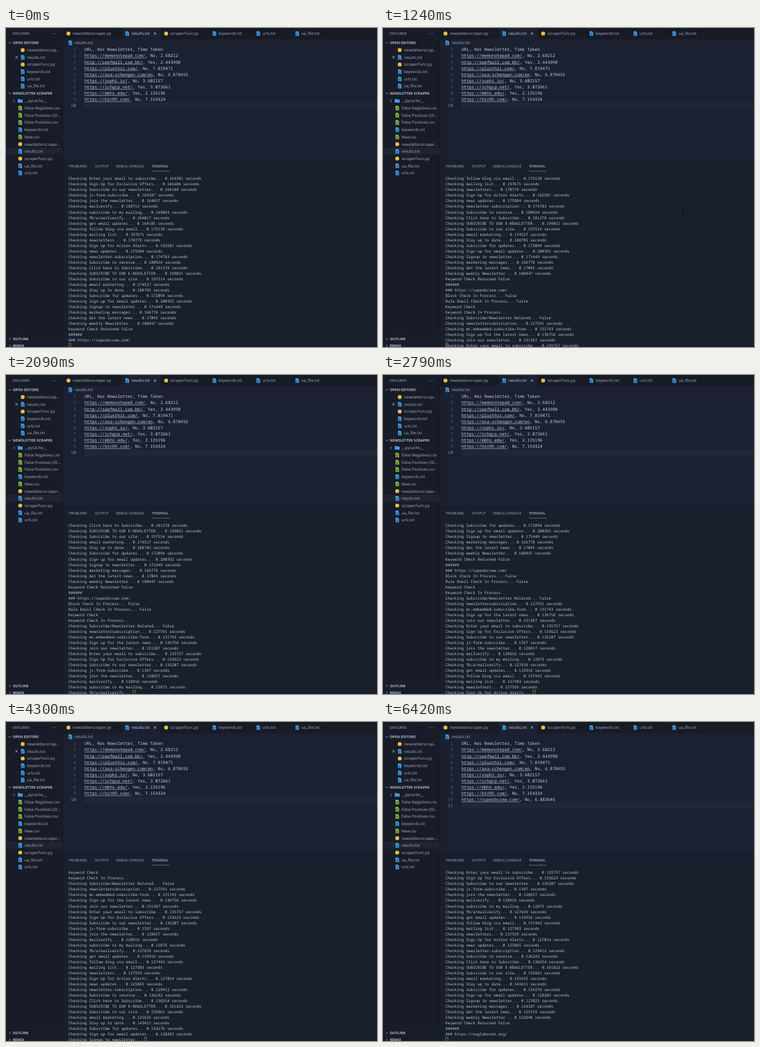
Recreate the animation shown at these times as an HTML page. Size 600 by 517 pixels, loop 6.48 s.

```html
<!DOCTYPE html>
<html lang="en">
<head>
<meta charset="utf-8">
<title>Newsletter scraper</title>
<style>
  html, body { margin: 0; width: 100%; height: 100%; overflow: hidden; background: #1b2130; }
  svg { display: block; width: 600px; height: 517px; }
  text { font: 6.4px "Open Sans", "Noto Sans", sans-serif; fill: #adb5c2; white-space: pre; text-rendering: geometricPrecision; }
  .caps { font-size: 5.6px; }
  .head { font-size: 5.8px; font-weight: 700; fill: #b4bbc8; }
  .lit { fill: #d3d9e2; }
  .code { font: 6.825px "Noto Sans Mono", "DejaVu Sans Mono", monospace; fill: #c9cfd9; }
  .num { fill: #566073; text-anchor: end; }
  .now { fill: #8a93a3; }
  .term { font: 6.2px "Noto Sans Mono", "DejaVu Sans Mono", monospace; fill: #bdc4ce; }
</style>
</head>
<body>
<svg id="stage" viewBox="0 0 600 517"></svg>
<script>
const LOOP = 6480, SAVED_AT = 4800, ROWS = 31, CHAR = 3.72, CODE_CHAR = 4.095;
const stage = document.getElementById('stage');

function add(tag, attrs, parent = stage) {
  const el = document.createElementNS('http://www.w3.org/2000/svg', tag);
  for (const key in attrs) el.setAttribute(key, attrs[key]);
  return parent.appendChild(el);
}
const rect = (x, y, width, height, fill, parent) => add('rect', { x, y, width, height, fill }, parent);
const path = (d, stroke, width = 0.8, parent) =>
  add('path', { d, stroke, 'stroke-width': width, fill: 'none' }, parent);
function label(x, mid, str, cls = '', parent) {
  const el = add('text', { x, y: mid + 2.3, class: cls }, parent);
  el.textContent = str;
  return el;
}

// Icons are centred on x, y
function page(x, y, fill) {
  add('path', { d: `M${x - 2.8} ${y - 3.8}h3.8l2 2v5.6h-5.8z`, fill });
  path(`M${x - 1.6} ${y - 0.4}h3.4m-3.4 1.6h3.4m-3.4 1.4h2.4`, '#1b2130', 0.5);
}
const icons = {
  py: (x, y) => add('circle', { cx: x, cy: y, r: 3.2, fill: '#e3bd45' }),
  txt: (x, y) => page(x, y, '#3f9be0'),
  csv: (x, y) => page(x, y, '#86b53c'),
  dir: (x, y) => add('path', { d: `M${x - 4} ${y - 3}h3l1 1h4v5h-8z`, fill: '#3f9be0' })
};
const cross = (x, y) => path(`M${x - 2} ${y - 2}l4 4m0-4l-4 4`, '#c3c9d4');
const chevron = (x, y, open) =>
  path(open ? `M${x - 2} ${y - 1}l2 2 2-2` : `M${x - 1} ${y - 2}l2 2-2 2`, '#a3abb9');

function file(x, y, name, kind, cls) {
  icons[kind](x, y);
  label(x + 7, y, name, cls);
}
function section(y, name, open) {
  chevron(6, y, open);
  label(11, y, name, 'head');
}

// Backgrounds
rect(0, 0, 92, 517, '#171c28');
rect(92, 0, 508, 18, '#161b26');
rect(188, 0, 62, 18, '#1b2130');
rect(92, 213, 508, 304, '#191f2c');
rect(92, 213, 508, 1, '#131722');
rect(91.5, 0, 0.8, 517, '#131722');

// Sidebar
label(11, 9, 'EXPLORER', 'caps');
for (const x of [75.5, 78, 80.5]) add('circle', { cx: x, cy: 9, r: 0.6, fill: '#a3abb9' });
rect(0, 194, 91.5, 11.6, '#1e2432');
section(24, 'OPEN EDITORS', true);
['newsletterscrap... py', 'results.txt txt', 'scraperFunc.py py', 'keywords.txt txt', 'urls.txt txt', 'ua_file.txt txt']
  .forEach((item, i) => {
    const [name, kind] = item.split(' ');
    file(27, 35.8 + i * 11.67, name, kind);
  });
cross(17, 47.4);
section(106, 'NEWSLETTER SCRAPER', true);
chevron(13, 118, false);
['__pycache__|dir', 'False Negatives.csv|csv', 'False Positives (Ol...|csv', 'False Positives.csv|csv',
 'keywords.txt|txt', 'New.csv|csv', 'newsletterscraper...|py', 'results.txt|txt', 'scraperFunc.py|py',
 'ua_file.txt|txt', 'urls.txt|txt']
  .forEach((item, i) => {
    const [name, kind] = item.split('|');
    file(23, 118 + i * 11.7, name, kind);
  });
rect(0, 497.5, 91.5, 0.6, '#202736');
rect(0, 509.5, 91.5, 0.6, '#202736');
section(504, 'OUTLINE', false);
section(515, 'REMIX', false);

// Editor tabs and breadcrumb
[[101, 'newsletterscraper.py'], [196, 'results.txt'], [259, 'scraperFunc.py'], [337, 'keywords.txt'],
 [408, 'urls.txt'], [471, 'ua_file.txt']]
  .forEach(([x, name]) => file(x, 9, name, name.split('.')[1], x === 196 ? 'lit' : ''));
cross(241, 9);
file(104, 24, 'results.txt', 'txt');

// Editor text
const lineY = i => 35 + i * 10.1;
const band = rect(127, 0, 473, 9.6, '#212735');
const saved = add('g', {});
function row(i, str, parent) {
  const y = lineY(i), url = str.split(',')[0];
  label(127, y, str, 'code', parent);
  if (i) rect(127, y + 3.3, url.length * CODE_CHAR, 0.7, '#aeb5c1', parent);
}
['URL, Has Newsletter, Time Taken', 'https://memonotepad.com/, No, 2.68212',
 'http://seefmall.com.bh/, Yes, 2.443998', 'https://plusthis.com/, No, 7.819471',
 'https://axa-schengen.com/en, No, 6.878455', 'https://sophi.io/, No, 3.602157',
 'https://ichgcp.net/, Yes, 3.072661', 'https://mbhs.edu/, Yes, 2.135196', 'https://bin95.com/, No, 7.154324']
  .forEach((str, i) => row(i, str));
row(9, 'https://superbcrew.com/, No, 6.883646', saved);
const numbers = Array.from({ length: 11 }, (_, i) => label(113, lineY(i), i + 1, 'code num'));

// Panel tabs
[[102, 'PROBLEMS'], [144, 'OUTPUT'], [178, 'DEBUG CONSOLE'], [236, 'TERMINAL']]
  .forEach(([x, name]) => label(x, 224, name, name === 'TERMINAL' ? 'caps lit' : 'caps'));
rect(236, 231.7, 28.5, 0.6, '#99a1ae');

// Terminal log: phrase, then the decimals of the first and second run
const checks = `Enter your email to subscribe|164381|135757
Sign Up for Exclusive Offers|166686|133623
Subscribe to our newsletter|164188|135207
js-form-subscribe|164287|1397
join the newsletter|164657|128657
mailverify|168713|128916
subscribe to my mailing|169043|12875
fb/a/mailverify|164017|127639
get email updates|164185|133916
follow blog via email|175138|137442
mailing list|197671|127303
newsletters|170779|137559
Sign Up for Action Alerts|182581|127014
news updates|175984|125865
newsletter-subscription|174783|129412
Subscribe to receive|180924|126242
Click here to Subscribe|181278|138254
SUBSCRIBE TO OUR E-NEWSLETTER|199021|161823
Subscribe to our site|197514|135861
email marketing|174527|125635
Stay up to date|188785|143411
Subscribe for updates|172094|134276
Sign up for email updates|200392|128283
Signup to newsletter|171449|127021
marketing messages|166778|124107
Get the latest news|17045|125319
weekly Newsletter|180447|122648`.split('\n').map(s => s.split('|'));

const log = [];
let clock = -9999;
const say = text => log.push({ head: text, tail: '', at: clock, end: clock });
function check(phrase, tail, seconds) {
  const at = clock;
  clock += seconds * 1000 + 2;
  log.push({ head: `Checking ${phrase}... `, tail, at, end: clock });
}
const timed = (phrase, digits) => check(phrase, `0.${digits} seconds`, +`0.${digits}`);
function finish(url) {
  say('Keyword Check Returned False');
  say('######');
  say('### ' + url);
}

for (const [phrase, first] of checks) timed(phrase, first);
finish('https://superbcrew.com/');
clock = 454;
['Block Check In Process... False', 'Rule Email Check In Process... False', 'Keyword Check', 'Keyword Check In Process...']
  .forEach(say);
check('Subscribe/Newsletter Related', 'False', 0.13);
[['newslettersubscription', '127591'], ['mc-embedded-subscribe-form', '131743'],
 ['Sign up for the latest news', '136756'], ['Join our newsletter', '131387']]
  .forEach(([phrase, digits]) => timed(phrase, digits));
for (const [phrase, , second] of checks) timed(phrase, second);
finish('https://eaglebrook.org/');

const rows = Array.from({ length: ROWS }, (_, i) => label(101, 244 + i * 9.035, '', 'term'));
const cursor = add('rect', { y: 511, width: 3.6, height: 8, fill: 'none', stroke: '#78a84a', 'stroke-width': 0.7 });
const mouse = path('M483.5 292.5h3m-1.5 0v7m-1.5 0h3', '#0b0e15', 0.8);

function draw(t) {
  const shown = log.filter(line => line.at <= t);
  const last = shown[shown.length - 1];
  const waiting = last.tail && t < last.end - 30;
  const top = shown.length - ROWS + (last.tail ? 0 : 1);
  rows.forEach((el, i) => {
    const line = shown[top + i];
    el.textContent = !line ? '' : line === last && waiting ? line.head : line.head + line.tail;
  });
  cursor.setAttribute('x', 101.3 + (waiting ? last.head.length * CHAR : 0));

  const current = t < SAVED_AT ? 9 : 10;
  saved.style.display = current === 10 ? '' : 'none';
  band.setAttribute('y', lineY(current) - 4.8);
  numbers.forEach((el, i) => {
    el.style.display = i > current ? 'none' : '';
    el.classList.toggle('now', i === current);
  });
  mouse.style.display = t >= 910 && t < 1580 ? '' : 'none';
}

const start = performance.now();
function tick() {
  draw((performance.now() - start) % LOOP);
  requestAnimationFrame(tick);
}
tick();
</script>
</body>
</html>
```
